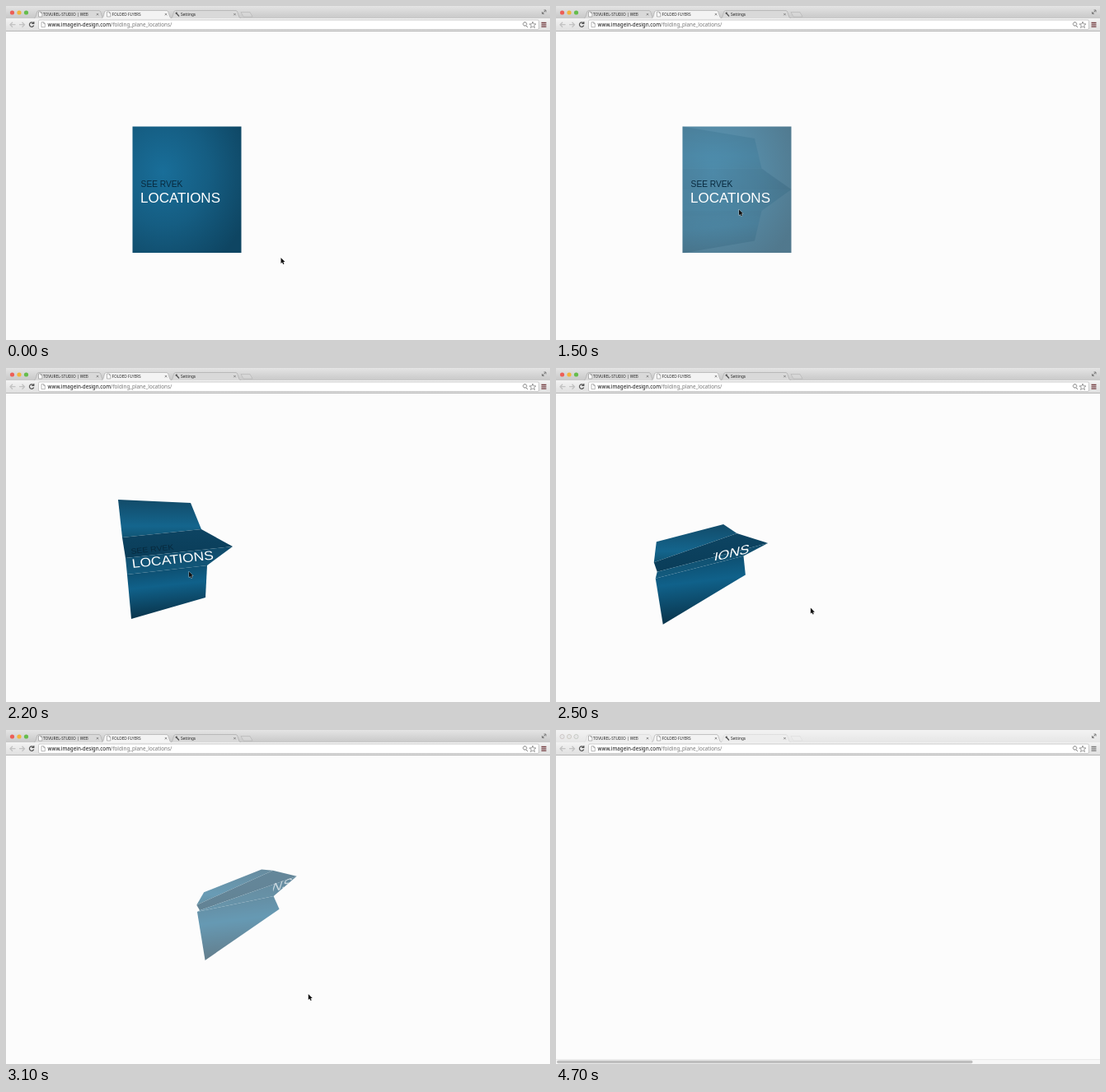
Write an HTML page that moves like this. It is 660x406 px and loops after 4.8 s.

```html
<!DOCTYPE html>
<html lang="en">
<head>
<meta charset="utf-8">
<title>Folding plane</title>
<style>
  html, body { margin: 0; width: 660px; height: 406px; overflow: hidden; background: #fcfcfc; }
  svg { display: block; }
  .tabs text { font: 4.75px "Noto Sans", sans-serif; fill: #222; }
  .url { font: 6.3px "Noto Sans", sans-serif; fill: #777; }
  .label { font-family: "Liberation Sans", Arial, sans-serif; }
  .line { fill: none; stroke: #777; stroke-width: .9; }
</style>
</head>
<body>
<svg width="660" height="406" viewBox="0 0 660 406">
  <defs>
    <linearGradient id="strip" x2="0" y2="1"><stop stop-color="#e4e4e4"/><stop offset="1" stop-color="#c8c8c8"/></linearGradient>
    <linearGradient id="bar" x2="0" y2="1"><stop stop-color="#f3f3f3"/><stop offset="1" stop-color="#dfdfdf"/></linearGradient>
    <linearGradient id="fadeText" gradientUnits="userSpaceOnUse" x1="97" x2="107"><stop stop-color="#222"/><stop offset="1" stop-color="#222" stop-opacity="0"/></linearGradient>
    <radialGradient id="glow" cx=".28" cy=".36" r=".85"><stop stop-color="#196e99"/><stop offset=".5" stop-color="#155d82"/><stop offset="1" stop-color="#0e4562"/></radialGradient>
    <linearGradient id="upper" x2="0" y2="1"><stop stop-color="#124b69"/><stop offset=".7" stop-color="#14658d"/><stop offset="1" stop-color="#105574"/></linearGradient>
    <linearGradient id="ridge" x2="0" y2="1"><stop stop-color="#0d4462"/><stop offset="1" stop-color="#0a3d59"/></linearGradient>
    <linearGradient id="valley" x2="0" y2="1"><stop stop-color="#0f4a69"/><stop offset="1" stop-color="#135b7e"/></linearGradient>
    <linearGradient id="lower" x1=".35" y1=".05" x2=".5" y2="1"><stop stop-color="#0d4d6e"/><stop offset=".35" stop-color="#10618a"/><stop offset="1" stop-color="#092f44"/></linearGradient>
    <clipPath id="panel"><polygon id="clip"/></clipPath>
    <path id="tab" d="M0 15C3 15 2.500 5.500 5.500 5.500H79C82 5.500 81.500 15 85 15" stroke="#a5a5a5" stroke-width=".6"/>
    <path id="doc" d="M0 0H2.700L4.300 1.700V6H0ZM2.700 0V1.700H4.300" fill="#fff" stroke="#888" stroke-width=".6"/>
    <path id="close" d="M-1.200-1.200L1.200 1.200M1.200-1.200L-1.200 1.200" stroke="#777" stroke-width=".8"/>
  </defs>

  <rect width="660" height="406" fill="#fcfcfc"/>
  <g id="scroll">
    <rect y="400.500" width="660" height="5.500" fill="#f7f7f7"/>
    <rect y="400.500" width="660" height=".6" fill="#dedede"/>
    <rect id="thumb" x="1" y="401.800" height="3.400" rx="1.700" fill="#bdbdbd"/>
  </g>

  <rect id="card" x="153.500" y="146.500" width="132" height="153.500" fill="url(#glow)"/>
  <g id="plane">
    <polygon data-points="ABCG" fill="url(#upper)"/>
    <polygon data-points="GCNM" fill="url(#ridge)"/>
    <polygon data-points="MNDH" fill="url(#valley)"/>
    <polygon data-points="HDEF" fill="url(#lower)"/>
  </g>
  <g id="words" clip-path="url(#panel)">
    <g id="label" class="label">
      <text x=".6" y="-19" font-size="10.200" fill="#08293d">SEE RVEK</text>
      <text font-size="17" fill="#fff">LOCATIONS</text>
    </g>
  </g>

  <rect width="660" height="15" fill="url(#strip)"/>
  <g class="tabs">
    <use href="#tab" x="34" fill="#d9d9d9"/>
    <use href="#tab" x="200" fill="#d9d9d9"/>
    <path d="M285 7.500H296L299 13H288Z" fill="#d6d6d6" stroke="#aaa" stroke-width=".5"/>
    <circle cx="7.500" cy="8" r="2.600" fill="#ec5f57"/>
    <circle cx="16" cy="8" r="2.600" fill="#f2b63c"/>
    <circle cx="24.500" cy="8" r="2.600" fill="#66bd4c"/>
    <g id="idle">
      <rect width="660" height="15" fill="#fff" opacity=".55"/>
      <g fill="#e6e6e6" stroke="#bbb" stroke-width=".6">
        <circle cx="7.500" cy="8" r="2.600"/><circle cx="16" cy="8" r="2.600"/><circle cx="24.500" cy="8" r="2.600"/>
      </g>
    </g>
    <use href="#tab" x="116" fill="#f3f3f3"/>
    <use href="#doc" x="39.500" y="7"/>
    <use href="#doc" x="122.500" y="7"/>
    <path d="M206 8L210 12.500M205.800 9.500L207.500 7.800" stroke="#555" stroke-width="1.300"/>
    <text x="45" y="11.800" style="fill:url(#fadeText)">TOVUREL-STUDIO | WEB</text>
    <text x="128.500" y="11.800">FOLDED FLYERS</text>
    <text x="212" y="11.800">Settings</text>
    <use href="#close" x="111" y="10.200"/><use href="#close" x="194" y="10.200"/><use href="#close" x="277.500" y="10.200"/>
    <path class="line" d="M650.500 9.500L655 5M652.500 5H655V7.500M650.500 7V9.500H653"/>
  </g>

  <rect y="15" width="660" height="15.500" fill="url(#bar)"/>
  <rect y="30" width="660" height=".8" fill="#aaa"/>
  <rect x="39.500" y="17" width="607" height="11.500" rx="1.500" fill="#fff" stroke="#b8b8b8" stroke-width=".7"/>
  <path class="line" style="stroke:#c2c2c2;stroke-width:1.300" d="M11.500 22.700H5M8 19.700L5 22.700L8 25.700M16 22.700H22.500M19.500 19.700L22.500 22.700L19.500 25.700"/>
  <path class="line" style="stroke:#555;stroke-width:1.200" d="M33.200 20.800A2.700 2.700 0 1 0 33.700 23.500M33.800 19V21.500H31.300"/>
  <use href="#doc" x="43" y="19.700"/>
  <text class="url" x="50.500" y="25"><tspan fill="#111">www.imagein-design.com</tspan>/folding_plane_locations/</text>
  <path class="line" d="M631 24L633 26M628 20.300A2.200 2.200 0 1 1 627.900 20.400"/>
  <path class="line" style="stroke-width:.7" d="M639 19L640 21.800L643 21.900L640.700 23.700L641.500 26.500L639 24.900L636.500 26.500L637.300 23.700L635 21.900L638 21.800Z"/>
  <path id="menu" d="M649.500 20.500H655.500M649.500 22.800H655.500M649.500 25.100H655.500" stroke-width="1.300"/>

  <path id="cursor" d="M0 0V7L1.600 5.600L2.700 8L3.900 7.500L2.900 5.100H5Z" fill="#111" stroke="#fff" stroke-width=".6" paint-order="stroke"/>
</svg>
<script>
const LOOP = 4800, STEP = 100;
const $ = id => document.getElementById(id);
const linear = p => p, easeOut = p => 1 - (1 - p) ** 2, easeIn = p => p ** 1.6;

// Rows are [time, ...values]; each segment may have its own easing.
function mix(rows, t, eases = []) {
  const i = rows.findIndex(row => row[0] > t);
  if (i === 0) return rows[0].slice(1);
  if (i < 0) return rows[rows.length - 1].slice(1);
  const a = rows[i - 1], b = rows[i];
  const p = (eases[i - 1] || linear)((t - a[0]) / (b[0] - a[0]));
  return a.slice(1).map((v, k) => v + (b[k + 1] - v) * p);
}

// A B C N D E F: outline; G M H: folds on the left; K L: left end of the visible lettering.
const NAMES = "ABCNDEFGMHKL";
const POSES = [
  [2000, 153.5,146.5, 241,161, 249.5,197.5, 285.5,223, 249.5,249, 241,285.5, 153.5,300.5, 153.5,197.5, 153.5,223, 153.5,249, 153.5,197.5, 153.5,249],
  [2200, 136,160, 224,164, 237,196, 275,217, 244,240, 242,279, 152,305, 141,206, 145,231, 147,251, 141,206, 147,251],
  [2900, 115,236, 193,202.5, 211,203.5, 248.5,211, 219.5,223, 224,238, 119,315, 108,251, 112,256, 108,258, 214,211, 214,226],
  [3400, 657,68, 700,60, 700,62, 700,67, 675,132, 690,150, 650,163, 642,85, 645,97, 645,98, 690,66, 690,90]
];
const LABEL = [
  [2000, 1, 0, 0, 1, 163, 239],
  [2200, 1.02, -.108, .117, .89, 153.500, 243],
  [2900, 1.04, -.33, -.3, .95, 124, 253],
  [3400, 1, -.33, -.3, .95, 650, 120]
];
const EASES = [linear, easeOut, easeIn];
const CARD = [[1200, 1], [1500, .72], [1900, .05], [2000, 0]];
const PLANE = [[1400, 0], [1500, .15], [1900, .72], [2200, 1], [2900, 1], [3400, .08], [3500, 0]];
const CURSOR = [[900, 333.500, 306], [1400, 222, 247.500], [2200, 222, 247.500], [2700, 366.800, 321], [3800, 366.800, 321], [4100, 511, 12]];
const THUMB = [[3200, 640], [3300, 590], [3400, 535], [3500, 518], [3700, 505.500]];

function draw(t) {
  const pose = mix(POSES, t, EASES);
  const points = names => [...names].map(n => {
    const i = 2 * NAMES.indexOf(n);
    return pose[i] + "," + pose[i + 1];
  }).join(" ");
  document.querySelectorAll("[data-points]").forEach(el => el.setAttribute("points", points(el.dataset.points)));
  $("clip").setAttribute("points", points("KCNDL"));
  $("label").setAttribute("transform", `matrix(${mix(LABEL, t, EASES)})`);

  const [planeAlpha] = mix(PLANE, t);
  $("card").setAttribute("opacity", mix(CARD, t)[0]);
  $("plane").setAttribute("opacity", planeAlpha);
  $("words").setAttribute("opacity", t < 2900 ? 1 : planeAlpha);

  $("cursor").setAttribute("transform", `translate(${mix(CURSOR, t)})`);
  $("cursor").style.display = t < 4200 ? "" : "none";
  $("scroll").style.display = t < 3200 ? "none" : "";
  $("thumb").setAttribute("width", mix(THUMB, t)[0] - 1);

  const idle = t >= 4700;
  $("idle").style.display = idle ? "" : "none";
  $("menu").setAttribute("stroke", idle ? "#777" : "#70383c");
}

const start = performance.now();
function frame() {
  const t = (performance.now() - start) % LOOP;
  draw(Math.floor(t / STEP) * STEP);
  requestAnimationFrame(frame);
}
frame();
</script>
</body>
</html>
```
